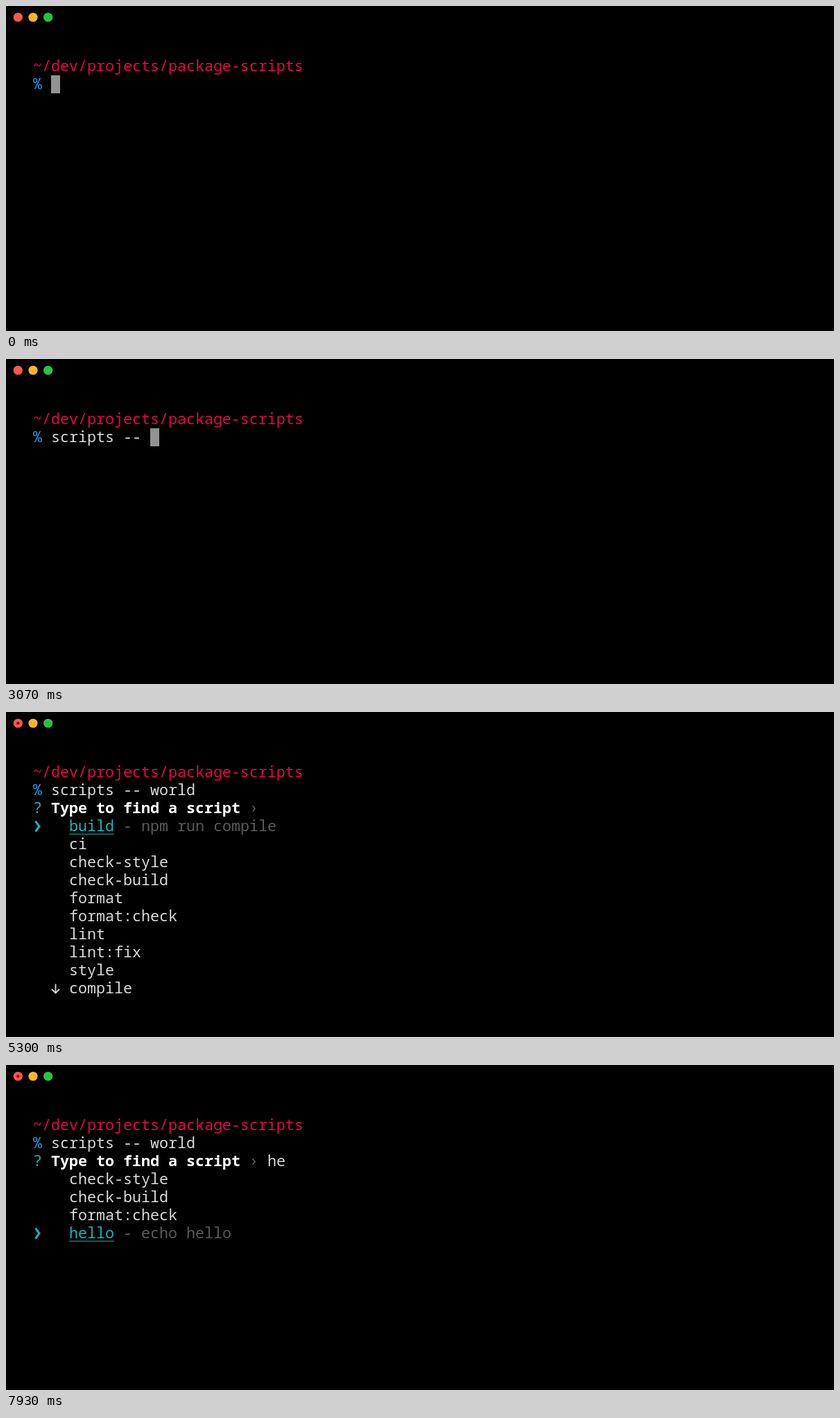
These frames come from a looping animation (1194 by 469 pixels, 8000 ms). An HTML page with a canvas:

```html
<!DOCTYPE html>
<html lang="en">
<head>
<meta charset="utf-8">
<title>Terminal</title>
<style>
  html, body { margin: 0; width: 100%; height: 100%; overflow: hidden; background: #000; }
  canvas { display: block; }
</style>
</head>
<body>
<canvas id="stage" width="1194" height="469"></canvas>
<script>
const ctx = document.getElementById('stage').getContext('2d');
const LOOP = 8000;
const CELL = 13, LINE = 26, LEFT = 39, TOP = 74;
const FONT = '21.667px "Noto Sans Mono", "DejaVu Sans Mono", monospace';
const COLOR = {
  path: '#e4064b', prompt: '#1e9df0', text: '#d9d9d9', bold: '#ffffff',
  cursor: '#929292', accent: '#14b5b8', dim: '#5a5a5a'
};
const BUTTONS = ['#ff5650', '#fdb42b', '#27c33f'];
const BUTTON_X = 17.33, BUTTON_Y = 16.25, BUTTON_GAP = 21.67;

const COMMAND = 'scripts -- world';
const KEY_TIMES = [1130, 1230, 1330, 1500, 1530, 1600, 1700, 1800,
                   2200, 2330, 2430, 3530, 3630, 3730, 3870, 3930];
const ENTER = 5100, HOVER = 5130, MENU = 5300;
const ARROW_TIMES = [6830, 7030, 7200];
const SEARCH = 'he', SEARCH_TIMES = [7800, 7900];
const MENU_SIZE = 10;
const SCRIPTS = [
  ['build', 'npm run compile'],
  ['ci', 'npm run check-style && npm run check-build'],
  ['check-style', 'npm run format:check && npm run lint'],
  ['check-build', 'npm run compile && npm test'],
  ['format'], ['format:check'], ['lint'], ['lint:fix'], ['style'], ['compile'],
  ['hello', 'echo hello']
];

const countPast = (times, t) => times.filter(time => t >= time).length;
const colX = col => LEFT + col * CELL;
const rowY = row => TOP + row * LINE;

function write(text, col, row, color, weight = 400) {
  ctx.font = `${weight} ${FONT}`;
  ctx.fillStyle = color;
  ctx.fillText(text, colX(col), rowY(row) + 20);
}

function dot(x, y, r, color) {
  ctx.fillStyle = color;
  ctx.beginPath();
  ctx.arc(x, y, r, 0, Math.PI * 2);
  ctx.fill();
}

function line(points, color, width) {
  ctx.strokeStyle = color;
  ctx.lineWidth = width;
  ctx.beginPath();
  points.forEach(([x, y]) => ctx.lineTo(x, y));
  ctx.stroke();
}

function drawCursor(col, row) {
  ctx.fillStyle = COLOR.cursor;
  ctx.fillRect(colX(col), rowY(row), CELL, LINE);
}

function drawPointer(row) {
  const y = rowY(row) + 13;
  line([[42.5, y - 7.5], [48, y], [42.5, y + 7.5]], COLOR.accent, 3);
}

function drawMoreArrow(row) {
  const x = colX(2) + 6.5, y = rowY(row) + 13;
  line([[x, y - 6.5], [x, y + 6.5]], COLOR.text, 1.8);
  line([[x - 5.5, y + 1], [x, y + 6.5], [x + 5.5, y + 1]], COLOR.text, 1.8);
}

function drawMenu(t) {
  const input = SEARCH.slice(0, countPast(SEARCH_TIMES, t));
  const matches = SCRIPTS.filter(([name]) => name.includes(input));
  const selected = countPast(ARROW_TIMES, t);

  write('?', 0, 2, COLOR.accent);
  write('Type to find a script', 2, 2, COLOR.bold, 700);
  write('›', 24, 2, COLOR.dim);
  write(input, 26, 2, COLOR.text);

  matches.slice(0, MENU_SIZE).forEach(([name, command], i) => {
    const row = i + 3, active = i === selected;
    write(name, 4, row, active ? COLOR.accent : COLOR.text);
    if (!active) return;
    drawPointer(row);
    ctx.fillStyle = COLOR.accent;
    ctx.fillRect(colX(4), rowY(row) + 23.7, name.length * CELL, 1);
    write('- ' + command, 5 + name.length, row, COLOR.dim);
  });
  if (matches.length > MENU_SIZE) drawMoreArrow(MENU_SIZE + 2);
}

function draw(t) {
  ctx.fillStyle = '#000';
  ctx.fillRect(0, 0, 1194, 469);

  BUTTONS.forEach((color, i) => dot(BUTTON_X + i * BUTTON_GAP, BUTTON_Y, 6.6, color));
  if (t >= HOVER) dot(BUTTON_X, BUTTON_Y, 2.2, '#8c0a08');

  const typed = countPast(KEY_TIMES, t);
  write('~/dev/projects/package-scripts', 0, 0, COLOR.path);
  write('%', 0, 1, COLOR.prompt);
  write(COMMAND.slice(0, typed), 2, 1, COLOR.text);

  const blinkedOff = (t >= 530 && t < 1000) || (t >= 4530 && t < 5000);
  if (t >= MENU) drawMenu(t);
  else if (t >= ENTER) drawCursor(0, 2);
  else if (!blinkedOff) drawCursor(2 + typed, 1);
}

const start = performance.now();
function tick() {
  draw((performance.now() - start) % LOOP);
  requestAnimationFrame(tick);
}
tick();
</script>
</body>
</html>
```
